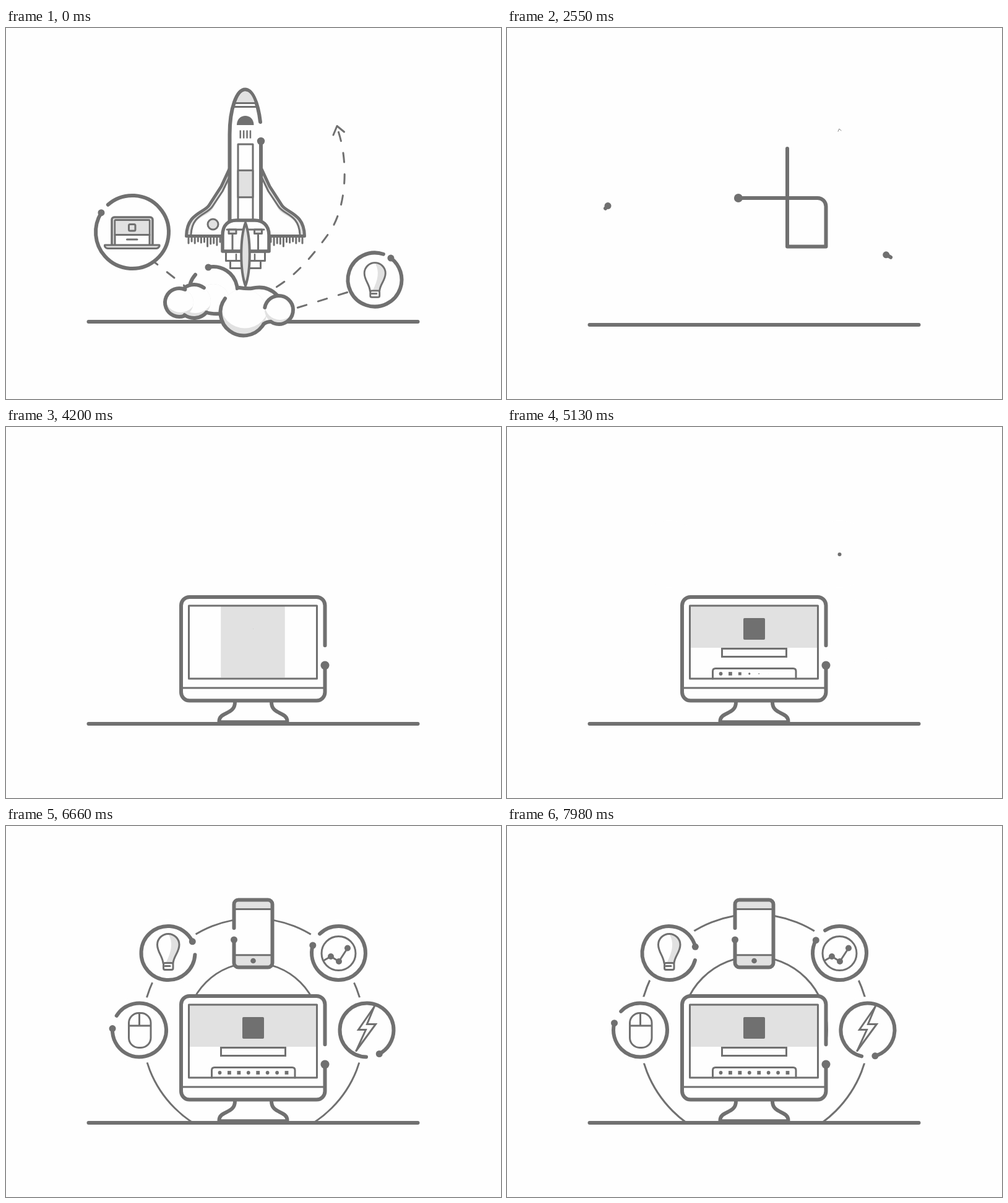
Write an HTML page with a canvas that moves like this. It is 800 px wide and 600 px high and loops after 8000 ms.

```html
<!DOCTYPE html>
<html lang="en">
<head>
<meta charset="utf-8">
<title>Launch and devices</title>
<style>
html, body { margin: 0; width: 100%; height: 100%; overflow: hidden; background: #fefefe; }
canvas { display: block; width: 800px; height: 600px; }
</style>
</head>
<body>
<canvas id="stage" width="800" height="600"></canvas>
<script>
const ctx = document.getElementById('stage').getContext('2d');
const INK = '#707070', GRAY = '#e1e1e1', PAPER = '#fefefe', LOOP = 8000;
const RAD = Math.PI / 180;
let t = 0;

// Sine ease from 0 to 1 between two times; gone() is the reverse.
const ease = (from, to) => (1 - Math.cos(Math.PI * Math.min(1, Math.max(0, (t - from) / (to - from))))) / 2;
const gone = (from, to) => 1 - ease(from, to);

const cache = {};
function curve(d) {
  if (!cache[d]) {
    const el = document.createElementNS('http://www.w3.org/2000/svg', 'path');
    el.setAttribute('d', d);
    cache[d] = { el, path: new Path2D(d), length: el.getTotalLength() };
  }
  return cache[d];
}
function fill(d, color = PAPER) {
  ctx.fillStyle = color;
  ctx.fill(curve(d).path);
}
function line(d, width = 3, fillColor) {
  if (fillColor) fill(d, fillColor);
  ctx.lineWidth = width;
  ctx.stroke(curve(d).path);
}
function trim(d, from, to, width = 3) {
  if (to - from < .1) return;
  ctx.setLineDash([to - from, 9999]);
  ctx.lineDashOffset = -from;
  line(d, width);
  ctx.setLineDash([]);
}
const draw = (d, part, width) => trim(d, 0, curve(d).length * part, width);
function dashes(d, shown, first = 0) {
  const end = curve(d).length * shown;
  for (let s = first; s < end; s += 34.5) trim(d, Math.max(0, s + 1.5), Math.min(end, s + 16.5));
}
function dot(x, y, r = 5.5, color = INK) {
  ctx.beginPath();
  ctx.arc(x, y, Math.max(0, r), 0, 7);
  ctx.fillStyle = color;
  ctx.fill();
}
function tip(d, at, r) {
  const p = curve(d).el.getPointAtLength(at);
  dot(p.x, p.y, r);
}
function arc(x, y, r, from, to, width = 6) {
  ctx.beginPath();
  ctx.arc(x, y, Math.max(0, r), from * RAD, to * RAD, to < from);
  ctx.lineWidth = width;
  ctx.stroke();
}
function rect(x, y, w, h, color) {
  ctx.fillStyle = color;
  ctx.fillRect(x, y, w, h);
}
function box(x, y, w, h, r, width = 3, color) {
  ctx.beginPath();
  ctx.roundRect(x, y, w, h, r);
  if (color) { ctx.fillStyle = color; ctx.fill(); }
  if (width) { ctx.lineWidth = width; ctx.stroke(); }
}
function scaled(x, y, sx, sy, paint) {
  if (Math.abs(sx) < .004 || Math.abs(sy) < .004) return;
  ctx.save();
  ctx.translate(x, y);
  ctx.scale(sx, sy);
  ctx.translate(-x, -y);
  paint();
  ctx.restore();
}
// Open ring whose leading end carries a dot.
function orbit(x, y, r, head, sweep, dotSize = 1) {
  if (Math.abs(sweep) > .5) arc(x, y, r, head - sweep, head);
  dot(x + r * Math.cos(head * RAD), y + r * Math.sin(head * RAD), 5.5 * dotSize);
}

function bulb(x, y, size) {
  scaled(x, y, size, size, () => {
    ctx.translate(x, y);
    fill('M1 -29C8 -17 6 -2 -4 17H8C9 5 18 -1 18 -13C18 -23 10 -30 1 -30Z', GRAY);
    line('M-8 17C-9 5 -17.5 -1 -17.5 -13A17.7 17.5 0 0 1 18 -13C18 -1 9 5 8 17');
    box(-7.5, 16.5, 15.5, 11, 2.5);
    line('M-5 21.5H3');
  });
}

/* Launch scene */
function laptop() {
  box(171, 306, 66, 47, 4, 3.5, GRAY);
  box(176, 310.5, 56, 41, 1, 3, PAPER);
  rect(177.5, 312, 53, 22, GRAY);
  line('M176 334.5H232M195.5 342H212');
  box(198.5, 317.5, 10.5, 10.5, 2);
  line('M159.5 351H248V353Q246 356.5 243 356.5H165Q161 356.5 159.5 353Z', 3, GRAY);
}

const TEETH = [349, 346, 349, 346, 348, 347, 354, 350, 349, 352, 347];
function wing() {
  fill('M361 228L348 256L328 287C320 299 292 300 291.5 336.5H299C302 302 326 307 335 291L359 249Z', GRAY);
  line('M360 243L350 264L334 288C325 303 301 300 299 334');
  line('M361 228L348 256L328 287C320 299 292 300 291.5 336.5H352', 5);
  scaled(320, 338, 1, gone(1620, 1750), () =>
    TEETH.forEach((y, i) => line(`M${295 + i * 5.1} 338V${y - 1}`)));
}
function wings() {
  const size = gone(1800, 2120);
  scaled(361, 325, size, size, () => {
    wing();
    dot(334.5, 317.5, 8.5, GRAY);
    arc(334.5, 317.5, 8.5, 0, 360, 3);
  });
  scaled(413, 325, size, size, () => {
    ctx.translate(774, 0);
    ctx.scale(-1, 1);
    wing();
  });
}
function hull() {
  const nose = gone(1630, 1755);
  scaled(387, 115, nose, nose, () => {
    fill('M372 121C376 108 381 102.5 387 102.5C393 102.5 398 108 402 121Z', GRAY);
    line('M370.5 121.5H403.5M369.5 127.5H404.5');
  });
  scaled(387, 150, gone(1640, 1780), gone(1640, 1780), () =>
    fill('M373 157C373 137 400.5 137 400.5 157Z', INK));
  scaled(387, 171.5, 1, Math.max(.06 * (t < 1800), gone(1640, 1780)), () => {
    for (let i = 0; i < 4; i++) rect(377.5 + i * 5.4, 165.5, 2.5, 13, INK);
  });
  scaled(387, 312, 1, gone(1850, 2120), () => {
    box(375, 188, 24, 126, 0);
    const h = 2 + 41.5 * gone(1630, 1765);
    box(375, 249 - h / 2 + 3 * gone(1630, 1765), 24, h, 0, 3, GRAY);
  });
}
function engine() {
  scaled(387, 362, 1, gone(1650, 1890), () => {
    box(355.5, 362, 63, 14.5, 0, 3, PAPER);
    box(362.5, 376.5, 49, 12, 0, 3, PAPER);
    line('M372 366V376M402 366V376', 2.5);
  });
  const size = gone(2000, 2300);
  scaled(387, 338, size, size, () => {
    line('M350 361V335C350 318 360 311 372 311H402C414 311 425 318 425 335V361Z', 5.5, PAPER);
    line('M366 333V360M407.5 333V360M357 326H417');
    box(360, 326, 12, 6.5, 0, 3, GRAY);
    box(401.5, 326, 12, 6.5, 0, 3, GRAY);
  });
  scaled(387, 315, 1, gone(1900, 2200), () =>
    line('M387 315C396 340 396 392 387 417C378 392 378 340 387 315Z', 4, GRAY));
}
function puff(x, y, r, shade = 0) {
  dot(x, y, r, GRAY);
  ctx.save();
  ctx.clip();
  dot(x + 2, y - shade, r + 2, PAPER);
  ctx.restore();
}
function clouds() {
  const grow = ease(0, 1620), left = gone(1720, 2320);
  const back = (1 + .055 * grow) * left, front = (1 + .078 * grow) * left;
  scaled(310, 448, back, back, () => {
    puff(335, 440, 26);
    puff(304, 442, 27, 10);
    puff(280, 444, 23, 9);
    arc(335, 425, 39, 258, 355);
    dot(327, 387, 5.5);
    arc(335, 425, 39, 199, 222);
    arc(280, 444, 23, 294, 70);
    arc(304, 442, 27, 236, 306);
    arc(304, 442, 27, 125, 42);
    line('M324 460Q333 463 347 462', 6);
  });
  scaled(420, 424, front, front, () => {
    puff(408, 451, 29);
    puff(384, 460, 37.5, 14);
    puff(441, 456, 23, 9);
    line('M377 420Q390 422 397 421Q422 415 438 432', 6);
    arc(384, 460, 37.5, 217, 30);
    line('M416.5 478.7Q421 475 427.8 475', 6);
    arc(441, 456, 23, 190, 485);
  });
}
function satellites() {
  const turn = 14 * ease(0, 2300), fade = gone(2600, 2800);
  const lap = gone(2150, 2565), lamp = gone(2100, 2530);
  dashes('M239 378L291 419', gone(1850, 2250), -9);
  dashes('M553 427L469 453', gone(1850, 2250));
  dashes('M537 167C553 215 552 290 521 333C500 362 470 402 428 424', gone(1850, 2450));
  const head = gone(2250, 2720);
  scaled(537.5, 165, head, head, () => line('M529 173L535 158.5L546.5 168'));
  scaled(204, 330, lap, lap, laptop);
  if (lamp > .01) bulb(596, 409, .96 * lamp);
  orbit(204, 330, 59, 212 + turn, 343.5 * gone(2000, 2600), fade);
  orbit(596, 407, 43.5, -53.4 - turn, -342 * gone(2020, 2620), fade);
}

/* One travelling line turns the hull into the monitor frame. */
const HULL = 'M411 152C407 118 397 99.5 386.5 99.5C373 99.5 361.5 130 361.5 172V312H412V183';
const LINK = HULL + 'C412 150 453 150 453 190V353.5H515.5';
const FRAME = LINK + 'V288.5A13.5 13.5 0 0 0 502 275H296.5A13.5 13.5 0 0 0 283 288.5V429A13.5 13.5 0 0 0 296.5 442.5H502A13.5 13.5 0 0 0 515.5 429V385.5';
function traveller() {
  const start = curve(HULL).length, end = curve(FRAME).length;
  const head = start + (end - start) * ease(2080, 3030);
  trim(FRAME, curve(LINK).length * ease(1900, 2920), head, 6);
  tip(FRAME, head, 6.2 + .8 * ease(2080, 2500));
}

/* Device scene */
function springRadius(size, from, to, swing, decay) {
  if (t < to) return size * Math.max(0, (t - from) / (to - from));
  const s = (t - to) / 1000;
  return size + swing * Math.sin(5 * Math.PI * s) * Math.exp(-decay * s);
}
const BADGES = [
  { x: 262, y: 205.5, tail: -2.6, from: 5210 },
  { x: 215.5, y: 330, tail: 206, from: 5230 },
  { x: 537.5, y: 205.5, tail: 219.5, from: 5320 },
  { x: 583, y: 330, tail: 85, from: 5350 }
];
function rings() {
  const outer = springRadius(186.5, 5825, 6000, 46.7, 2.6);
  const inner = springRadius(118.5, 5901, 6010, 48, 1.8);
  ctx.save();
  ctx.beginPath();
  ctx.rect(0, 0, 800, 479);
  ctx.clip();
  if (outer > 1) arc(399.5, 329, outer, 0, 360, 3 * outer / 186.5);
  if (inner > 1) arc(399.5, 329, inner, 0, 360, Math.min(3, 2 + inner / 118.5));
  ctx.restore();
  for (const b of BADGES) dot(b.x, b.y, 54, PAPER);
  rect(368, 119, 63, 110, PAPER);
}
function badges() {
  for (const b of BADGES) {
    const sweep = 331 * ease(b.from, b.from + 740);
    if (sweep > 0) orbit(b.x, b.y, 43.5, b.tail + 9 * (t - 5970) / 1000 + sweep, sweep, Math.min(1, sweep / 10));
  }
}
const PHONE = 'M368.5 165V126.5A7 7 0 0 1 375.5 119.5H423.5A7 7 0 0 1 430.5 126.5V221.5A7 7 0 0 1 423.5 228.5H375.5A7 7 0 0 1 368.5 221.5V184';
function wide(x, y, half, part) {
  if (part > .01) line(`M${x - half * part} ${y}H${x + half * part}`);
}
function phone() {
  const p = ease(5280, 6020);
  const top = ease(5650, 5900), low = ease(5890, 6150);
  scaled(399.5, 122, top, 1, () => fill('M371.5 134V126Q371.5 122.5 375 122.5H424Q427.5 122.5 427.5 126V134Z', GRAY));
  scaled(399.5, 218, low, 1, () => fill('M371.5 209V222Q371.5 225.5 375 225.5H424Q427.5 225.5 427.5 222V209Z', GRAY));
  ctx.lineCap = 'butt';
  wide(399.5, 134.5, 31, ease(5830, 6120));
  wide(399.5, 208.8, 31, ease(5940, 6240));
  ctx.lineCap = 'round';
  dot(399.5, 218, 4.3 * ease(6080, 6330));
  draw(PHONE, p, 6);
  if (p > 0) tip(PHONE, curve(PHONE).length * p, 5.5 * Math.min(1, p * 20));
}
function mouse() {
  draw('M216 302.5H218A16 16 0 0 1 234 318.5V342.5A16 16 0 0 1 218 358.5H214.5A16 16 0 0 1 198.5 342.5V318.5A16 16 0 0 1 214.5 302.5H216', ease(5500, 5850));
  wide(216, 323, 17.5, ease(5700, 5930));
  draw('M215.5 322V303', ease(5920, 6200));
}
const CHART = 'M513.5 217.5L525 211L538 219L552 197.5';
function chart() {
  arc(537.5, 206, 27.5 * ease(5550, 5850), 0, 360, 3 * ease(5550, 5600));
  draw(CHART, ease(5800, 6310));
  dot(525, 211, 5 * ease(5830, 5980));
  dot(538, 219, 5 * ease(6020, 6180));
  dot(552, 197.5, 5 * ease(6200, 6380));
}
function bolt() {
  const p = ease(5650, 6190);
  ctx.lineJoin = 'miter';
  draw('M595 292.5L569.5 329.5H581.5L566 363.5', p);
  draw('M595 292.5L583.5 320.5H597.5L566 363.5', p);
  ctx.lineJoin = 'round';
}

function stand() {
  const p = ease(3500, 4010);
  if (p <= 0) return;
  fill('M370 443C370 465 344.5 460 344.5 477H455C455 460 429.5 465 429.5 443Z');
  draw('M370 445C370 466 344.5 460 344.5 476', p, 6);
  draw('M429 445C429 466 454.5 460 454.5 476', p, 6);
  if (p > .8) rect(399.5 - 55 * (p - .8) * 5, 474.3, 110 * (p - .8) * 5, 4, INK);
}
const DOCK = 'cssc scc s'.replaceAll(' ', '');
function screen() {
  rect(296.5 + 102.5 * gone(4050, 4350), 290, 205 * ease(4050, 4350), 115 - 48 * ease(4420, 4740), GRAY);
  draw('M295.5 289H502.5V407H295.5Z', ease(3180, 3820));
  ctx.lineCap = 'butt';
  wide(399.5, 422, 114, ease(3930, 4180));
  ctx.lineCap = 'round';
  const icon = ease(4180, 4480);
  scaled(399.5, 326.5, icon, icon, () => box(382, 309, 35, 35, 2, 0, INK));
  scaled(399.5, 364.5, ease(4480, 4770), 1, () => {
    ctx.lineJoin = 'miter';
    box(347.5, 358.5, 104, 13, 0, 3, PAPER);
    ctx.lineJoin = 'round';
  });
  scaled(399.5, 407, 1, ease(4780, 5030), () =>
    line('M332.5 407V395Q332.5 390.5 337 390.5H462.5Q467 390.5 467 395V407'));
  [...DOCK].forEach((kind, i) => {
    const x = 345.5 + i * 15.43, r = 2.9 * ease(4960 + i * 30, 5110 + i * 30);
    if (kind === 'c') dot(x, 399, r); else rect(x - r, 399 - r, 2 * r, 2 * r, INK);
  });
}

function paint() {
  ctx.fillStyle = PAPER;
  ctx.fillRect(0, 0, 800, 600);
  ctx.strokeStyle = INK;
  ctx.lineCap = ctx.lineJoin = 'round';
  const launch = t < 2820;

  if (launch) { satellites(); wings(); }
  if (t > 5100) {
    rings();
    badges();
    const lamp = ease(5500, 5850);
    if (lamp > 0) bulb(262, 205, lamp);
    mouse(); chart(); bolt(); phone();
  }
  if (t > 3030) {
    stand();
    box(283, 275, 232.5, 167.5, 13.5, 0, PAPER);
    screen();
  }
  const ground = 475 + 5 * ease(2280, 2560);
  line(`M133.5 ${Math.round(ground * 10) / 10}H665.5`, 6);
  traveller();
  if (launch) { hull(); engine(); clouds(); }
}

const begin = performance.now();
function frame() {
  t = (performance.now() - begin) % LOOP;
  paint();
  requestAnimationFrame(frame);
}
frame();
</script>
</body>
</html>
```
